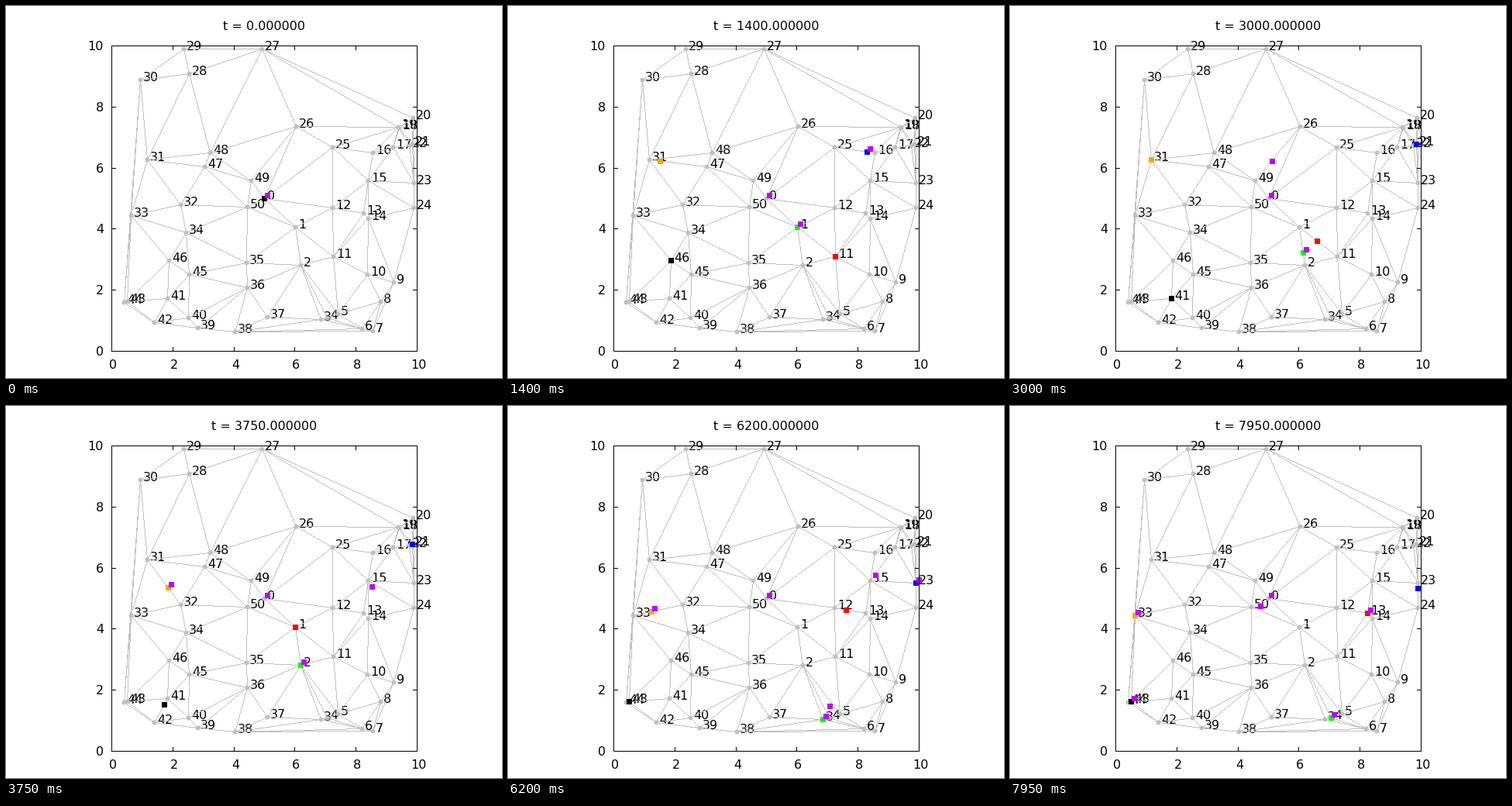
Write a matplotlib script that moves like this. It is 640 by 480 pixels and loops after 8 s.

```python
import math

import numpy as np
import matplotlib.pyplot as plt
from matplotlib.animation import FuncAnimation
from matplotlib.patches import Rectangle
from matplotlib.tri import Triangulation

W, H, DPI = 640, 480, 100
PX = 72 / DPI                      # one pixel in points
LEFT, RIGHT, TOP, BOTTOM = 136, 530, 51, 445
STEP, FRAMES = 50, 160
CAR_SPEED = 0.1085                 # pixels per ms
DRONE_SPEED = 2 * CAR_SPEED
GRAY = 0.753

# Road crossings in pixels; the roads are their Delaunay triangulation
NODES = np.array([
    (333, 248), (373, 285), (380, 334), (406, 404), (414, 402), (428, 397),
    (459, 416), (473, 419), (483, 381), (500, 356), (466, 346), (422, 323),
    (421, 260), (461, 267), (467, 274), (467, 225), (473, 189), (499, 182),
    (507, 157), (506, 156), (525, 144), (524, 178), (520, 180), (526, 228),
    (526, 260), (421, 182), (374, 155), (330, 55), (236, 87), (229, 55),
    (173, 95), (182, 198), (225, 256), (161, 270), (232, 292), (310, 331),
    (311, 363), (337, 401), (295, 420), (247, 415), (235, 402), (208, 377),
    (191, 408), (156, 381), (152, 382), (236, 346), (210, 328),
    (256, 207), (263, 189), (316, 225), (311, 259)], float)

# Each car: trips as (departure, crossings passed)
CARS = {
    "#ff0000": [(0, [0, 1, 11]), (2700, [11, 1]), (4350, [1, 12]),
                (6058, [12, 13])],
    "#00ff00": [(0, [0, 1]), (2690, [1, 2]), (4571, [2, 3]), (7000, [3, 4])],
    "#0000ff": [(0, [0, 25, 16, 17, 22, 21]), (3800, [21, 22]),
                (5650, [22, 23]), (7885, [23, 24])],
    "#ffa500": [(0, [0, 49, 47, 31]), (3335, [31, 32]), (5818, [32, 33]),
                (8530, [33, 44])],
    "#000000": [(0, [0, 50, 34, 46, 41]), (3667, [41, 42]),
                (5795, [42, 43])],
}
RED, GREEN, BLUE, ORANGE, BLACK = CARS
HOME = (333, 248)

# Each drone: hops as (take-off, car or spot to meet)
HOPS = [
    [(0, HOME)],
    [(0, GREEN)],
    [(0, GREEN), (525, BLUE), (2115, ORANGE)],
    [(0, GREEN), (3146, BLUE), (6985, ORANGE)],
    [(0, GREEN), (4450, RED), (5910, (470, 222)), (6200, RED)],
    [(0, GREEN), (6136, RED)],
    [(0, GREEN), (6400, BLACK)],
]


def along(path, dist):
    for a, b in zip(path, path[1:]):
        p, q = NODES[a], NODES[b]
        size = math.dist(p, q)
        if dist < size:
            return p + (q - p) * dist / size
        dist -= size
    return NODES[path[-1]]


def place(goal, t):
    """Position of a car, or of a fixed spot, at time t."""
    if goal not in CARS:
        return np.array(goal, float)
    start, path = [trip for trip in CARS[goal] if trip[0] <= t][-1]
    return along(path, (t - start) * CAR_SPEED)


def plan(hops):
    """Straight flights that meet each goal where it will be."""
    legs, spot = [], None
    for i, (start, goal) in enumerate(hops):
        p = place(goal if i == 0 else hops[i - 1][1], start)
        land = start
        while math.dist(p, place(goal, land)) > DRONE_SPEED * (land - start):
            land += 1
        legs.append((start, land, p, goal))
    return legs


def drone_pos(legs, t):
    start, land, p, goal = [leg for leg in legs if leg[0] <= t][-1]
    if t >= land:
        return place(goal, t)
    return p + (place(goal, land) - p) * (t - start) / (land - start)


fig = plt.figure(figsize=(W / DPI, H / DPI), dpi=DPI, facecolor="white")
ax = fig.add_axes([0, 0, 1, 1])
ax.axis("off")


def text(x, y, s, ha="left"):
    return ax.text(x, y, s, ha=ha, va="baseline", fontsize=16 * PX,
                   family="DejaVu Sans", color="black", zorder=1)


def line(xs, ys):
    ax.plot(xs, ys, color="black", lw=PX, antialiased=False, zorder=9)


def square(color, z):
    return ax.add_patch(Rectangle((0, 0), 7, 7, fc=color, lw=0, zorder=z,
                                  antialiased=False))


def move(box, spot):
    box.set_xy(np.round(spot) - 3)


# Frame, ticks and their labels
line([LEFT, RIGHT, RIGHT, LEFT, LEFT], [TOP, TOP, BOTTOM, BOTTOM, TOP])
for v in range(0, 11, 2):
    x = round(LEFT + v * (RIGHT - LEFT) / 10)
    y = round(BOTTOM - v * (BOTTOM - TOP) / 10)
    for a, b in ((BOTTOM, BOTTOM - 5), (TOP, TOP + 5)):
        line([x, x], [a, b])
    for a, b in ((LEFT, LEFT + 5), (RIGHT, RIGHT - 5)):
        line([a, b], [y, y])
    text(x + 2, 468, str(v), "center")
    text(126, y + 6, str(v), "right")

# Roads as crisp one-pixel lines over the crossing numbers
roads = np.full((H, W, 4), GRAY)
roads[..., 3] = 0
for a, b in Triangulation(NODES[:, 0], NODES[:, 1]).edges:
    n = int(max(abs(NODES[b] - NODES[a]))) + 1
    xs, ys = np.round(np.linspace(NODES[a], NODES[b], n)).astype(int).T
    roads[ys, xs, 3] = 1
ax.imshow(roads, extent=(0, W, H, 0), interpolation="nearest",
          aspect="auto", zorder=2)
for i, (x, y) in enumerate(NODES):
    text(x + 4, y + 2, str(i))
ax.plot(*NODES.T, "o", ms=6 * PX, mew=0, color=str(GRAY), zorder=3)

ax.set_xlim(0, W)
ax.set_ylim(H, 0)

title = text(333, 31, "", "center")
cars = {c: square(c, 5 + i / 10) for i, c in enumerate(CARS)}
drones = [(square("#c000ff", 7), plan(hops)) for hops in HOPS]


def draw(n):
    t = n * STEP
    title.set_text(f"t = {t:.6f}")
    for c, box in cars.items():
        move(box, place(c, t))
    for box, legs in drones:
        move(box, drone_pos(legs, t) + (4, -4))


anim = FuncAnimation(fig, draw, frames=FRAMES, interval=STEP, repeat=True,
                     repeat_delay=0, blit=False)
plt.show()
```
